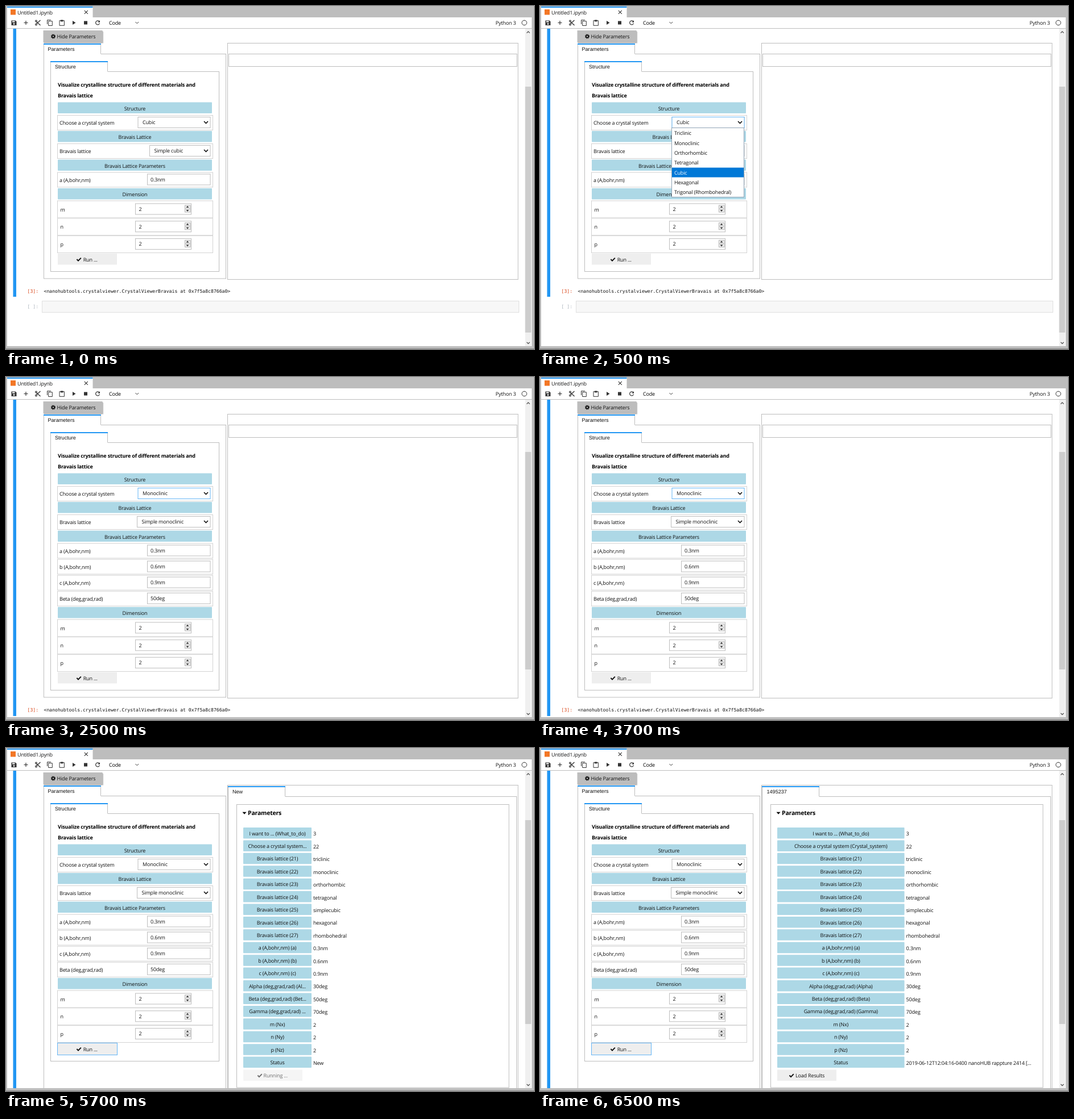
An HTML page that plays this animation: 928x604 px, repeating every 8 s.

```html
<!DOCTYPE html>
<html lang="en">
<head>
<meta charset="utf-8">
<title>Crystal viewer notebook</title>
<style>
  html, body { margin: 0; width: 100%; height: 100%; overflow: hidden; background: #bdbdbd; }
  svg { display: block; width: 928px; height: 604px; }
  text {
    font: 9px "Open Sans", "Noto Sans", sans-serif;
    letter-spacing: -.17px; fill: #111; text-rendering: geometricPrecision;
  }
  .mid { text-anchor: middle; }
  .bold { font-weight: 700; fill: #000; }
  .title { font-size: 10.5px; font-weight: 700; letter-spacing: -.2px; fill: #000; }
  .tab { font: 9.1px "Liberation Sans", Arial, sans-serif; letter-spacing: 0; }
  .mono { font: 8.14px "DejaVu Sans Mono", monospace; letter-spacing: 0; }
  .line { fill: none; stroke: #333; stroke-width: 1; }
  .solid { fill: #333; }

  .scene { opacity: 0; animation: 8s step-end infinite; }
  .cubic { animation-name: cubic; }
  .menu { animation-name: menu; }
  .mono-cl { animation-name: monoclinic; }
  .chosen { animation-name: chosen; }
  .ran { animation-name: ran; }
  .running { animation-name: running; }
  .loaded { animation-name: loaded; }
  @keyframes cubic { 0% { opacity: 1 } 31.25%, 100% { opacity: 0 } }
  @keyframes menu { 0% { opacity: 0 } 6.25% { opacity: 1 } 31.25%, 100% { opacity: 0 } }
  @keyframes monoclinic { 0% { opacity: 0 } 31.25%, 100% { opacity: 1 } }
  @keyframes chosen { 0% { opacity: 0 } 31.25% { opacity: 1 } 56.25%, 100% { opacity: 0 } }
  @keyframes ran { 0% { opacity: 0 } 56.25%, 100% { opacity: 1 } }
  @keyframes running { 0% { opacity: 0 } 56.25% { opacity: 1 } 81.25%, 100% { opacity: 0 } }
  @keyframes loaded { 0% { opacity: 0 } 81.25%, 100% { opacity: 1 } }
</style>
</head>
<body>
<svg id="stage" viewBox="0 0 928 604" xmlns="http://www.w3.org/2000/svg"></svg>
<script>
const GREY = '#bdbdbd', BLUE = '#2196f3', PALE = '#add8e6', FOCUS = '#64b5f6';
const stage = document.getElementById('stage');
let layer = stage;

function add(tag, attrs, content) {
  const el = document.createElementNS('http://www.w3.org/2000/svg', tag);
  for (const key in attrs) el.setAttribute(key, attrs[key]);
  if (content) el.textContent = content;
  layer.appendChild(el);
  return el;
}
const fill = (x, y, width, height, color, rx = 0) =>
  add('rect', { x, y, width, height, fill: color, rx });
const frame = (x, y, width, height, stroke = GREY, color = '#fff') =>
  add('rect', { x: x + .5, y: y + .5, width, height, fill: color, stroke });
const path = (d, cls = 'line', extra = {}) => add('path', { d, class: cls, ...extra });
const text = (x, y, str, cls = '', extra = {}) => add('text', { x, y, class: cls, ...extra }, str);

function scene(name, draw) {
  layer = stage;
  layer = add('g', { class: 'scene ' + name });
  draw();
  layer = stage;
}

function check(x, y, color = '#111') {
  path(`M${x - 3.6} ${y}l2.6 2.6l4.8-5`, 'line', { style: `stroke:${color};stroke-width:2` });
}

function tabPanel(x, y, right, bottom, label, labelX) {
  frame(x, y + 18, right - x, bottom - y - 18);
  fill(x, y, 101, 19, '#fff');
  path(`M${x + .5} ${y + 19}V${y}M${x + 100.5} ${y}V${y + 18.5}`, 'line', { style: `stroke:${GREY}` });
  fill(x, y, 101, 2, BLUE);
  if (label) text(labelX, y + 13, label, 'tab');
}

function bar(y, label) {
  fill(91, y, 271, 19.5, PALE, 1);
  text(226.5, y + 14, label, 'mid');
}

function row(y, h, label, x = 94) {
  frame(90, y, 273, h, '#d2d2d2');
  text(x, y + h / 2 + 4, label);
}

function select(x, y, value, focused) {
  frame(x, y, 359 - x - .5, 19, focused ? FOCUS : GREY);
  text(x + 8.5, y + 13.3, value);
  path(`M348 ${y + 8}l3.5 3.5l3.5-3.5`, 'line', { style: 'stroke:#111;stroke-width:1.6' });
}

function field(y, label, value) {
  row(y, 26, label);
  frame(248, y + 3, 110.5, 19);
  text(254, y + 16.3, value);
}

function counter(y, label) {
  row(y, 30, label, 95.5);
  frame(227, y + 5, 98, 19);
  text(233.5, y + 18.3, '2');
  frame(314, y + 8, 9.5, 12, '#b5b5b5', '#efefef');
  path(`M314 ${y + 14.5}h10`, 'line', { style: 'stroke:#b5b5b5' });
  path(`M316.5 ${y + 12.5}h5l-2.5-3zM316.5 ${y + 16.5}h5l-2.5 3z`, 'solid');
}

function dimension(y) {
  bar(y, 'Dimension');
  ['m', 'n', 'p'].forEach((name, i) => counter(y + 21.5 + i * 30.8, name));
}

function runButton(y, focused) {
  if (focused) frame(90, y - 1, 105, 21, FOCUS, '#eee');
  else fill(91, y, 104, 19.5, '#eee');
  check(128, y + 10);
  text(135.7, y + 13.7, 'Run ...');
}

function form(bottom) {
  tabPanel(66, 66, 386, bottom + 12.5, 'Parameters', 73.5);
  tabPanel(78, 97, 374, Math.min(bottom, 551), 'Structure', 86);
  text(91, 141.7, 'Visualize crystalline structure of different materials and', 'bold');
  text(91, 161.2, 'Bravais lattice', 'bold');
  bar(169.5, 'Structure');
  row(192, 26, 'Choose a crystal system');
  bar(220, 'Bravais Lattice');
  row(242, 26, 'Bravais lattice');
  bar(270.5, 'Bravais Lattice Parameters');
  field(292.5, 'a (A,bohr,nm)', '0.3nm');
}

function emptyViewer(bottom) {
  frame(389, 65, 510.5, bottom - 65);
  frame(391, 84, 506.5, 22);
}

function output(y) {
  text(37.5, y, '[3]:', 'mono', { style: 'fill:#d84315' });
  text(66.5, y, '<nanohubtools.crystalviewer.CrystalViewerBravais at 0x7f5a8c8766a0>', 'mono');
}

const thumb = (top, bottom) => fill(912.5, top, 10.5, bottom - top, '#cdcdcd');
const cellBar = bottom => fill(12.5, 40, 5.5, bottom - 40, BLUE);

const params = [
  ['I want to ... (What_to_do)', '3'],
  ['Choose a crystal system (Crystal_system)', '22', 'Choose a crystal system...'],
  ...['triclinic', 'monoclinic', 'orthorhombic', 'tetragonal', 'simplecubic', 'hexagonal', 'rhombohedral']
    .map((name, i) => [`Bravais lattice (${21 + i})`, name]),
  ['a (A,bohr,nm) (a)', '0.3nm'],
  ['b (A,bohr,nm) (b)', '0.6nm'],
  ['c (A,bohr,nm) (c)', '0.9nm'],
  ['Alpha (deg,grad,rad) (Alpha)', '30deg', 'Alpha (deg,grad,rad) (Al...'],
  ['Beta (deg,grad,rad) (Beta)', '50deg', 'Beta (deg,grad,rad) (Bet...'],
  ['Gamma (deg,grad,rad) (Gamma)', '70deg', 'Gamma (deg,grad,rad) ...'],
  ['m (Nx)', '2'], ['n (Ny)', '2'], ['p (Nz)', '2']
];

function results(width, status, short) {
  [...params, ['Status', status]].forEach(([label, value, cut], i) => {
    const y = 140 + i * 22.42;
    fill(417, y, width, 19.5, PALE, 1);
    text(417 + width / 2, y + 13.6, short && cut || label, 'mid');
    text(417 + width + 3, y + 14.4, value);
  });
}

// Window and toolbar
fill(2, 20, 922, 579, '#fff');
fill(2, 1, 150.5, 20, '#fff');
fill(2, 1, 150.5, 2, BLUE);
fill(8, 6, 9, 9.5, '#f37726');
text(20, 14.7, 'Untitled1.ipynb');
path('M137.8 7.8l6 6m0-6l-6 6', 'line', { style: 'stroke-width:1.1' });
fill(2, 39, 922, 1, GREY);

path('M9.5 25.5h7l2 2v6.5h-9z', 'solid');
fill(11, 26.5, 4.5, 2.2, '#fff');
add('circle', { cx: 14, cy: 31.6, r: 1.4, fill: '#fff' });
path('M35 26v7M31.5 29.5h7', 'line', { style: 'stroke-width:1.2' });
path('M53.5 27.8l7 6.2M53.5 31.2l7-6.2', 'line', { style: 'stroke-width:1.4' });
for (const cy of [26.6, 32.4]) add('circle', { cx: 53, cy, r: 1.4, class: 'line', style: 'stroke-width:1.2' });
path('M72.5 32V24.7h6.5M74.7 26.7h6.6v7.8h-6.6z');
path('M94 25.7h8.4v8.6H94z');
fill(96, 24.5, 4.5, 2.8, '#333');
path('M117 26l5.5 3.5l-5.5 3.5z', 'solid');
fill(137, 26.5, 6, 6, '#333');
path('M163.8 27.2a3.5 3.5 0 1 0 .7 3.2', 'line', { style: 'stroke-width:1.2' });
path('M165 25.2v3.6h-3.6z', 'solid');
text(181, 32.8, 'Code', '', { style: 'fill:#000' });
path('M227.5 28l2.8 2.8l2.8-2.8');
text(860.5, 32.8, 'Python 3');
add('circle', { cx: 911, cy: 29.5, r: 4.3, class: 'line' });

// Scrollbar track
fill(912.5, 40, 10.5, 559, '#f0f0f0');
path('M915.3 47.5l2.6-2.6l2.6 2.6M915.3 592l2.6 2.6l2.6-2.6', 'line', { style: 'stroke:#505050;stroke-width:1.3' });

scene('cubic', () => {
  thumb(142, 575);
  cellBar(512);
  form(467);
  select(231.5, 195, 'Cubic');
  select(252, 245, 'Simple cubic');
  dimension(321);
  runButton(436);
  emptyViewer(481);
  output(504.5);
  text(37.5, 532, '[ ]:', 'mono', { style: 'fill:#a8b0b8' });
  frame(63, 519, 838, 20, '#e0e0e0', '#f7f7f7');
});

scene('menu', () => {
  select(231.5, 195, 'Cubic', true);
  frame(231, 214, 127, 122, '#8fa3b5');
  ['Triclinic', 'Monoclinic', 'Orthorhombic', 'Tetragonal', 'Cubic', 'Hexagonal', 'Trigonal (Rhombohedral)']
    .forEach((name, i) => {
      const y = 215.4 + i * 17.3, on = name === 'Cubic';
      if (on) fill(232, y, 126, 17, '#0078d7');
      text(236, y + 12, name, '', on ? { style: 'fill:#fff' } : {});
    });
});

function monoclinicForm(bottom, focusSelect) {
  form(bottom);
  select(231.5, 195, 'Monoclinic', focusSelect);
  select(230, 245, 'Simple monoclinic');
  field(320.6, 'b (A,bohr,nm)', '0.6nm');
  field(348.7, 'c (A,bohr,nm)', '0.9nm');
  field(376.8, 'Beta (deg,grad,rad)', '50deg');
  dimension(405);
  runButton(520, !focusSelect);
}

scene('chosen', () => {
  thumb(132, 515);
  cellBar(597);
  monoclinicForm(551, true);
  emptyViewer(565);
  output(588.5);
});

scene('ran', () => {
  thumb(127, 486);
  cellBar(599);
  monoclinicForm(620, false);
  frame(389, 65, 510.5, 560);
  tabPanel(390, 67, 897, 630);
  frame(405, 99, 478.5, 498.5);
  path('M415.5 112.7h7l-3.5 4z', 'solid', { style: 'fill:#000' });
  text(425, 118.4, 'Parameters', 'title');
});

scene('running', () => {
  text(398, 80, 'New', 'tab');
  results(120, 'New', true);
  fill(417, 566.5, 104, 19.5, '#f5f5f5');
  check(446, 576.5, '#707070');
  text(452.5, 580, 'Running ...', '', { style: 'fill:#707070' });
});

scene('loaded', () => {
  text(398.5, 80, '1495237', 'tab');
  results(223.5, '2019-06-12T12:04:16-0400 nanoHUB rappture 2414 [...');
  fill(417, 566.5, 104, 19.5, '#eee');
  check(442, 576.5);
  text(449, 580, 'Load Results');
});

// Toggle button
fill(66.5, 45, 105, 21, 'rgba(0,0,0,.12)', 1);
fill(66, 44, 104.5, 21, 'rgba(0,0,0,.2)', 1);
fill(65.5, 43, 104, 21, GREY);
add('circle', { cx: 83, cy: 53.5, r: 3.3, class: 'line', style: 'stroke:#111;stroke-width:1.6;stroke-dasharray:1.296' });
add('circle', { cx: 83, cy: 53.5, r: 2.2, class: 'line', style: 'stroke:#111;stroke-width:1.8' });
text(89.5, 57, 'Hide Parameters');

// Window edge
fill(0, 599, 928, 5, GREY);
fill(0, 603, 928, 1, '#8c8c8c');
</script>
</body>
</html>
```
